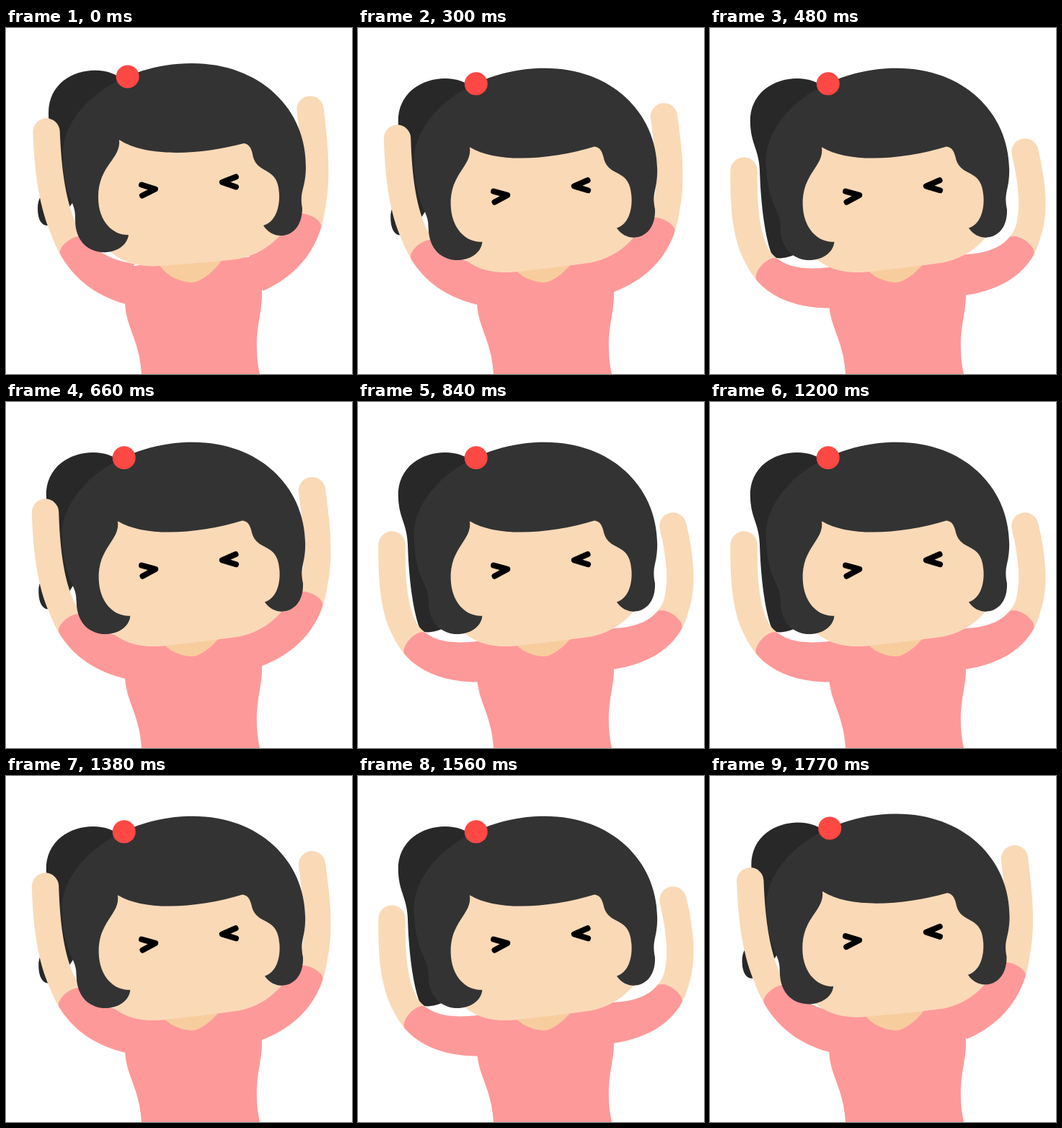
An HTML page with a canvas that plays this animation: 480x480 px, repeating every 1.8 s.

```html
<!DOCTYPE html>
<html lang="en">
<head>
<meta charset="utf-8">
<title>Cheering girl</title>
<style>
  html, body { margin: 0; width: 100%; height: 100%; overflow: hidden; background: #fff; }
  canvas { display: block; }
</style>
</head>
<body>
<canvas id="stage" width="480" height="480"></canvas>
<script>
const ctx = document.getElementById('stage').getContext('2d');
const STEP = 30, CYCLE = 360, LOOP = 1800;
const HAIR = '#333333', TAIL = '#282828', SKIN = '#fad9b7',
      NECK = '#f8cd9e', SHIRT = '#fe9999', BEAD = '#fe4843';

const hair = new Path2D(`M157 155 C160 182 128 190 128 235 C128 270 150 288 170 287
  C166 320 95 325 96 265 C98 240 79 235 79 175 C79 110 160 49 258 49
  C352 49 418 112 416 195 C415 225 407 225 411 250 C411 292 372 298 357 274
  C372 270 380 252 379 230 C378 190 347 205 342 175 C340 165 336 161 330 160
  C270 176 195 180 157 155Z`);
const face = new Path2D(`M130 150 L125 280 C140 322 180 333 215 330
  C255 327 290 324 318 321 C345 317 370 303 388 278 L385 150Z`);
const torso = new Path2D(`M165 333 C215 320 300 325 355 315 V364
  C356 395 347 410 348 445 Q348 462 352 480 H188 C185 430 165 415 165 378Z`);
const neck = new Path2D('M206 310 C212 345 245 353 258 353 C270 353 295 335 306 310Z');

// Arm spines from hand to shoulder: raised, then lowered.
const arms = [
  [[56,144, 60,245, 78,335, 172,355], [47,198, 46,295, 58,368, 172,360]],
  [[422,113, 432,200, 445,300, 346,338], [437,172, 455,250, 460,335, 346,343]]
];
// Loose end of the ponytail: curled out, then hanging in.
const tailEnds = [
  [74,225, 44,220, 44,250, 44,270, 52,275, 60,274, 90,260],
  [70,230, 74,280, 84,305, 92,309, 103,307, 112,304, 120,260]
];

const clamp = v => Math.max(0, Math.min(1, v));
const smooth = v => v * v * (3 - 2 * v);
const mix = ([a, b], k) => a.map((v, i) => v + (b[i] - v) * k);
const radius = t => 18.7 + 10 * clamp(2 * t - 1);

// Strong ease in and out: Bezier handles at one and two thirds.
function ease(u) {
  let lo = 0, hi = 1;
  for (let i = 0; i < 24; i++) {
    const s = (lo + hi) / 2;
    if (2 * s - 3 * s * s + 2 * s * s * s < u) lo = s; else hi = s;
  }
  return smooth(lo);
}

function fill(path, color) {
  ctx.fillStyle = color;
  ctx.fill(path);
}

function spineAt(p, t) {
  const u = 1 - t;
  const at = i => u * u * u * p[i] + 3 * u * u * t * p[i + 2] + 3 * u * t * t * p[i + 4] + t * t * t * p[i + 6];
  const slope = i => u * u * (p[i + 2] - p[i]) + 2 * u * t * (p[i + 4] - p[i + 2]) + t * t * (p[i + 6] - p[i + 4]);
  return { x: at(0), y: at(1), angle: Math.atan2(slope(1), slope(0)) };
}

// A widening tube along the spine; bulge is how far its first end is rounded.
function limb(spine, from, to, bulge, color) {
  const path = new Path2D(), steps = 24;
  const edge = (i, side) => {
    const t = from + (to - from) * i / steps;
    const { x, y, angle } = spineAt(spine, t);
    const r = side * radius(t);
    path.lineTo(x - Math.sin(angle) * r, y + Math.cos(angle) * r);
  };
  for (let i = 0; i <= steps; i++) edge(i, 1);
  for (let i = steps; i >= 0; i--) edge(i, -1);
  const end = spineAt(spine, from), r = radius(from);
  path.ellipse(end.x, end.y, r * bulge, r, end.angle, -Math.PI / 2, Math.PI / 2, true);
  fill(path, color);
}

function drawArm(poses, k) {
  const spine = mix(poses, k);
  limb(spine, 0, 0.66, 1, SKIN);
  limb(spine, 0.61, 1, 0.5, SHIRT);
}

function drawTail(swing) {
  const e = mix(tailEnds, swing);
  const path = new Path2D('M165 75 C140 45 59 55 59 118 C59 150 71 155 70 190');
  path.bezierCurveTo(...e.slice(0, 6));
  path.bezierCurveTo(...e.slice(6, 12));
  path.bezierCurveTo(e[12], e[13], 120, 200, 150, 120);
  fill(path, TAIL);
}

function inHead(tilt, paint) {
  ctx.save();
  ctx.translate(460, 220);
  ctx.rotate(-0.0335 * tilt);
  ctx.translate(-460, -220);
  paint();
  ctx.restore();
}

function drawHead() {
  fill(face, SKIN);
  fill(hair, HAIR);
  ctx.lineWidth = 8;
  ctx.lineJoin = ctx.lineCap = 'round';
  ctx.stroke(new Path2D('M188 217.5 L207 223.5 L189 232.5 M319 206.5 L300 214 L319 220.5'));
  const bead = new Path2D();
  bead.arc(168.7, 67.5, 16, 0, Math.PI * 2);
  fill(bead, BEAD);
}

function draw(time) {
  const t = time % CYCLE;
  const near = Math.min(t, CYCLE - t);
  const drop = ease(near / (CYCLE / 2)) * 1.167;
  const tilt = smooth(clamp(near / 60));
  const swing = smooth(clamp((near - 60) / 60));

  ctx.fillStyle = '#fff';
  ctx.fillRect(0, 0, 480, 480);
  inHead(tilt, () => drawTail(swing));
  arms.forEach(poses => drawArm(poses, drop));
  fill(torso, SHIRT);
  fill(neck, NECK);
  inHead(tilt, drawHead);
}

const start = performance.now();
function tick() {
  const time = (performance.now() - start) % LOOP;
  draw(Math.floor(time / STEP) * STEP);
  requestAnimationFrame(tick);
}
tick();
</script>
</body>
</html>
```
